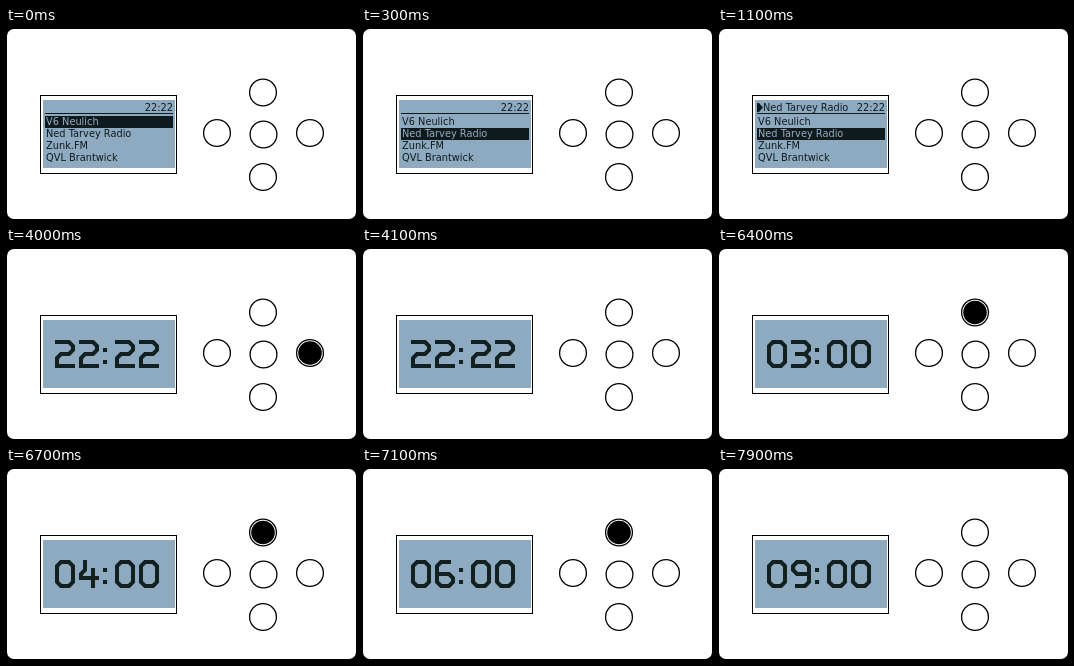
An HTML page that plays this animation: 350 by 192 pixels, repeating every 8 s.

```html
<!DOCTYPE html>
<html lang="en">
<head>
<meta charset="utf-8">
<title>Radio alarm clock</title>
<style>
  html, body { margin: 0; width: 100%; height: 100%; overflow: hidden; background: #000; }
  svg { display: block; width: 100%; height: 100%; }
  text { font: 9.8px "DejaVu Sans", sans-serif; fill: #0f1a1c; white-space: pre; }
  text.selected { fill: #94afc3; }
  .ring { fill: #fff; stroke: #000; stroke-width: 1.3; }
  .stroke { fill: none; stroke: #12201f; stroke-linecap: square; }
</style>
</head>
<body>
<svg viewBox="0 0 350 192">
  <rect x="1" y="1" width="349" height="190" rx="7" fill="#fff"/>
  <rect x="34.5" y="67.5" width="136" height="78" fill="#fff" stroke="#000"/>
  <rect x="37" y="72" width="132" height="68" fill="#8eaac0"/>
  <g id="menu">
    <g id="playing">
      <path d="M39 75h2l4 4.5-4 4.5h-2z" fill="#0f1a1c"/>
      <text x="45" y="83">Ned Tarvey Radio</text>
    </g>
    <text x="167" y="83" text-anchor="end">22:22</text>
    <rect x="39" y="85" width="128" height="1" fill="#0f1a1c"/>
    <rect id="highlight" x="39" width="128" height="12" fill="#0f1a1c"/>
  </g>
  <g id="clock"></g>
  <g id="buttons"></g>
</svg>
<script>
const LOOP = 8000;
const STATIONS = ["V6 Neulich", "Ned Tarvey Radio", "Zunk.FM", "QVL Brantwick"];
const BUTTONS = { up: [257, 64.5], left: [211, 105], ok: [257.5, 106.5], right: [304, 105], down: [257, 149] };

// Digit strokes on a 5 x 7 grid of cell centres
const GLYPHS = {
  0: "M1 0H3L4 1V5L3 6H1L0 5V1Z",
  2: "M0 0H3L4 1V2L3 3H1L0 4V6H4",
  3: "M0 0H3L4 1V2L3 3H1M3 3L4 4V5L3 6H0",
  4: "M1 0V2L0 3V4H4M3 2V6",
  5: "M4 0H0V3H3L4 4V5L3 6H0",
  6: "M3 0H1L0 1V5L1 6H3L4 5V4L3 3H0",
  7: "M0 0H4V1L2 3V6",
  8: "M1 0H3L4 1V2L3 3H1L0 2V1ZM1 3L0 4V5L1 6H3L4 5V4L3 3",
  9: "M4 3H1L0 2V1L1 0H3L4 1V5L3 6H1",
  ":": "M0 2h.01M0 5h.01"
};
const CELL = 4;

const PRESSES = [[1000, "ok"], [4000, "right"], [5900, "right"],
  [6400, "up"], [6700, "up"], [6900, "up"], [7100, "up"], [7800, "up"]];
const HOUR_STEPS = [6500, 6800, 7000, 7200, 7500, 7900];

const $ = id => document.getElementById(id);
function add(parent, tag, attrs, text = "") {
  const node = document.createElementNS("http://www.w3.org/2000/svg", tag);
  for (const key in attrs) node.setAttribute(key, attrs[key]);
  node.textContent = text;
  return parent.appendChild(node);
}

const rows = STATIONS.map((name, i) => add($("menu"), "text", { x: 40, y: 97 + 12 * i }, name));
const discs = {};
for (const name in BUTTONS) {
  const [cx, cy] = BUTTONS[name];
  add($("buttons"), "circle", { cx, cy, r: 13.4, class: "ring" });
  discs[name] = add($("buttons"), "circle", { cx, cy, r: 11.8 });
}

let shownTime = "";
function drawClock(time) {
  if (time === shownTime) return;
  shownTime = time;
  $("clock").replaceChildren();
  let x = 51;
  for (const char of time) {
    add($("clock"), "path", { d: GLYPHS[char], class: "stroke", transform: `translate(${x} 94) scale(${CELL})` });
    x += CELL * (char === ":" ? 3 : 6);
  }
}

function show(node, visible) {
  node.style.display = visible ? "" : "none";
}

function render(t) {
  const inMenu = t < 4000;
  const selected = t < 300 ? 0 : 1;
  show($("menu"), inMenu);
  show($("clock"), !inMenu);
  show($("playing"), t >= 1100);
  $("highlight").setAttribute("y", 88 + 12 * selected);
  rows.forEach((row, i) => row.classList.toggle("selected", i === selected));

  const hour = 3 + HOUR_STEPS.filter(step => t >= step).length;
  drawClock(t < 5900 ? "22:22" : `0${hour}:00`);

  const press = PRESSES.find(([start]) => t >= start && t < start + 100);
  for (const name in discs) show(discs[name], press && press[1] === name);
}

const start = performance.now();
function tick() {
  render((performance.now() - start) % LOOP);
  requestAnimationFrame(tick);
}
tick();
</script>
</body>
</html>
```
